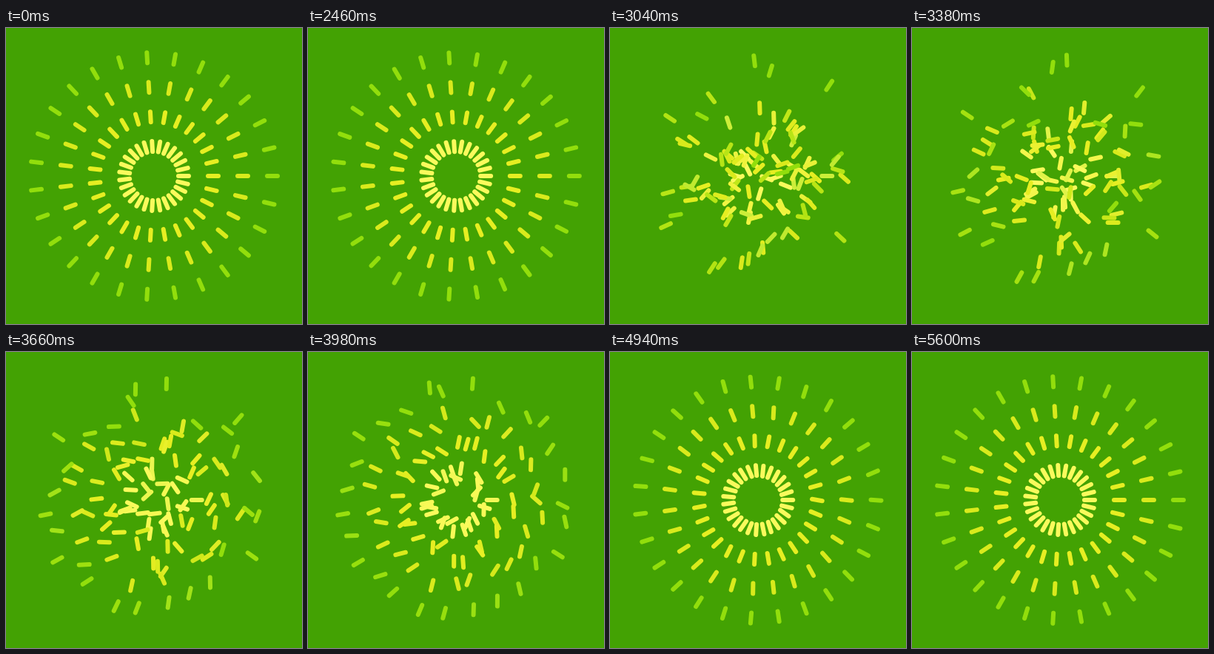
An HTML page with a canvas that plays this animation: 400x400 px, repeating every 5.62 s.

```html
<!DOCTYPE html>
<html lang="en">
<head>
<meta charset="utf-8">
<title>Burst</title>
<style>
html, body { margin: 0; height: 100%; overflow: hidden; background: #43a203; }
canvas { display: block; }
</style>
</head>
<body>
<canvas id="stage" width="400" height="400"></canvas>
<script>
const ctx = document.getElementById('stage').getContext('2d');
const LOOP = 5620, REST = 2460, SPOKES = 27;
const COLORS = [[250, 250, 92], [230, 238, 34], [217, 234, 28], [146, 222, 12]];

let seed = 41;
const random = () => (seed = (seed * 16807) % 2147483647) / 2147483647;
const mix = (a, b, t) => a + (b - a) * t;
const easeOut = (t, power) => 1 - (1 - t) ** power;

const slots = COLORS.flatMap((color, ring) =>
  Array.from({ length: SPOKES }, (_, i) => {
    const angle = i * 2 * Math.PI / SPOKES;
    const radius = 40 * (ring + 1);
    return {
      color,
      angle,
      x: 200 + radius * Math.cos(angle),
      y: 200 + radius * Math.sin(angle)
    };
  })
);

// Every dash swaps its slot for a random other one.
const origins = slots.slice();
for (let i = origins.length - 1; i > 0; i--) {
  const j = Math.floor(random() * (i + 1));
  [origins[i], origins[j]] = [origins[j], origins[i]];
}

function drawDash(from, to, move, turn) {
  const x = mix(from.x, to.x, move);
  const y = mix(from.y, to.y, move);
  const angle = mix(from.angle, to.angle, turn);
  const dx = 7 * Math.cos(angle), dy = 7 * Math.sin(angle);
  ctx.strokeStyle = `rgb(${to.color.map((c, k) => Math.round(mix(from.color[k], c, move)))})`;
  ctx.beginPath();
  ctx.moveTo(x - dx, y - dy);
  ctx.lineTo(x + dx, y + dy);
  ctx.stroke();
}

const start = performance.now();
function frame() {
  const time = (performance.now() - start) % LOOP;
  const progress = Math.max(0, (time - REST) / (LOOP - REST));
  const move = easeOut(progress, 4), turn = easeOut(progress, 2.3);
  ctx.fillStyle = '#43a203';
  ctx.fillRect(0, 0, 400, 400);
  ctx.lineWidth = 6;
  ctx.lineCap = 'round';
  slots.forEach((slot, i) => drawDash(origins[i], slot, move, turn));
  requestAnimationFrame(frame);
}
frame();
</script>
</body>
</html>
```
